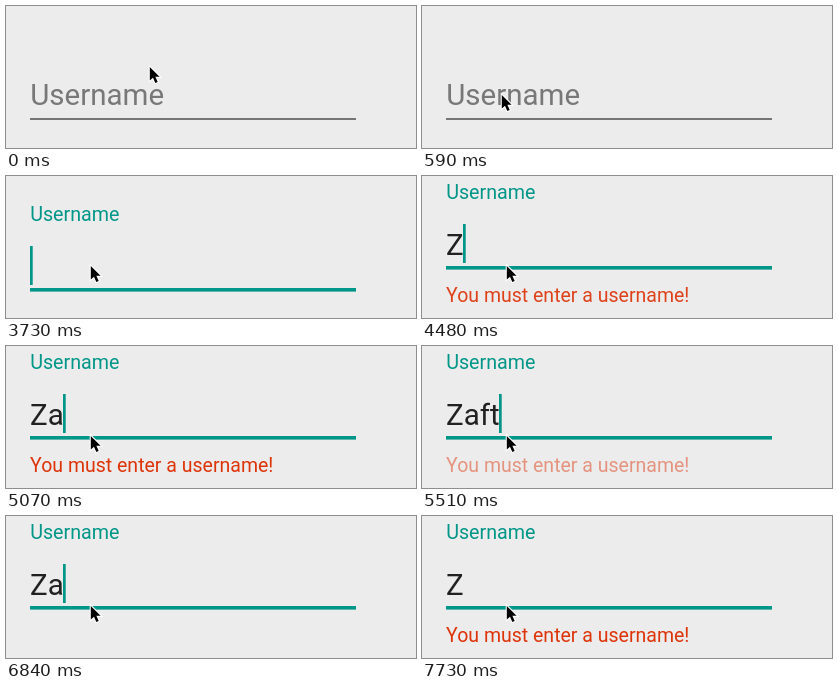
An HTML page that plays this animation: 410x142 px, repeating every 8 s.

```html
<!DOCTYPE html>
<html lang="en">
<head>
<meta charset="utf-8">
<title>Floating label field</title>
<style>
  html, body { margin: 0; width: 100%; height: 100%; overflow: hidden; background: #ececec; }
  svg { display: block; font-family: Roboto, sans-serif; }
</style>
</head>
<body>
<svg width="410" height="142" viewBox="0 0 410 142">
  <g id="field">
    <text id="label" x="24.2">Username</text>
    <text id="value" x="24" y="79" font-size="29.5" fill="#212121"></text>
    <rect id="caret" y="48" width="2.7" height="39" fill="#009688"/>
    <rect id="line" x="24" y="90" width="326"/>
    <text id="error" x="24.1" y="126" font-size="19.5" fill="#dd3409">You must enter a username!</text>
  </g>
  <path id="pointer" d="M.8 1V14.6L4 11.7L6.3 16.9L8.7 15.9L6.4 10.8H10.6Z" stroke="#fff" stroke-width="2.2" paint-order="stroke"/>
</svg>
<script>
const LOOP = 8000;
const $ = id => document.getElementById(id);
const set = (id, attrs) => {
  for (const name in attrs) $(id).setAttribute(name, attrs[name]);
};
const mix = (a, b, p) => a + (b - a) * p;

// Each entry changes part of the state from its time on.
const steps = [
  [0, { pointer: [143, 60], focus: false, float: 0, text: '', caret: false, error: 0, drop: 22 }],
  [140, { pointer: [135, 65] }],
  [290, { pointer: [112, 75] }],
  [440, { pointer: [88, 85] }],
  [590, { pointer: [79, 88] }],
  [3140, { pointer: [81, 88] }],
  [3290, { pointer: [83, 89] }],
  [3440, { pointer: [84, 89] }],
  [3590, { focus: true, caret: true, float: 0.5 }],
  [3730, { float: 1 }],
  [4030, { caret: false }],
  [4480, { text: 'Z', caret: true, error: 0.92, drop: 0 }],
  [4630, { error: 1 }],
  [4920, { caret: false }],
  [5070, { text: 'Za', caret: true }],
  [5220, { text: 'Zaf' }],
  [5360, { error: 0.9 }],
  [5510, { text: 'Zaft', error: 0.48 }],
  [5660, { error: 0 }],
  [5960, { caret: false }],
  [6550, { caret: true }],
  [6690, { text: 'Zaf' }],
  [6840, { text: 'Za' }],
  [6990, { error: 0.85 }],
  [7290, { text: 'Z', error: 0.95 }],
  [7430, { error: 1 }],
  [7730, { caret: false }]
];

function draw(t) {
  const s = Object.assign({}, ...steps.filter(step => step[0] <= t).map(step => step[1]));
  set('field', { transform: `translate(0 ${s.drop})` });
  set('label', {
    y: mix(77.3, 22.5, s.float),
    'font-size': mix(29.5, 19.7, s.float),
    fill: s.focus ? '#009688' : '#787878'
  });
  set('line', s.focus
    ? { height: 3.6, fill: '#009688' }
    : { height: 2, fill: '#757575' });
  $('value').textContent = s.text;
  set('caret', { x: Math.floor(24 + $('value').getComputedTextLength()), opacity: +s.caret });
  set('error', { opacity: s.error });
  set('pointer', { transform: `translate(${s.pointer})` });
}

const start = performance.now();
function tick() {
  draw((performance.now() - start) % LOOP);
  requestAnimationFrame(tick);
}
tick();
</script>
</body>
</html>
```
